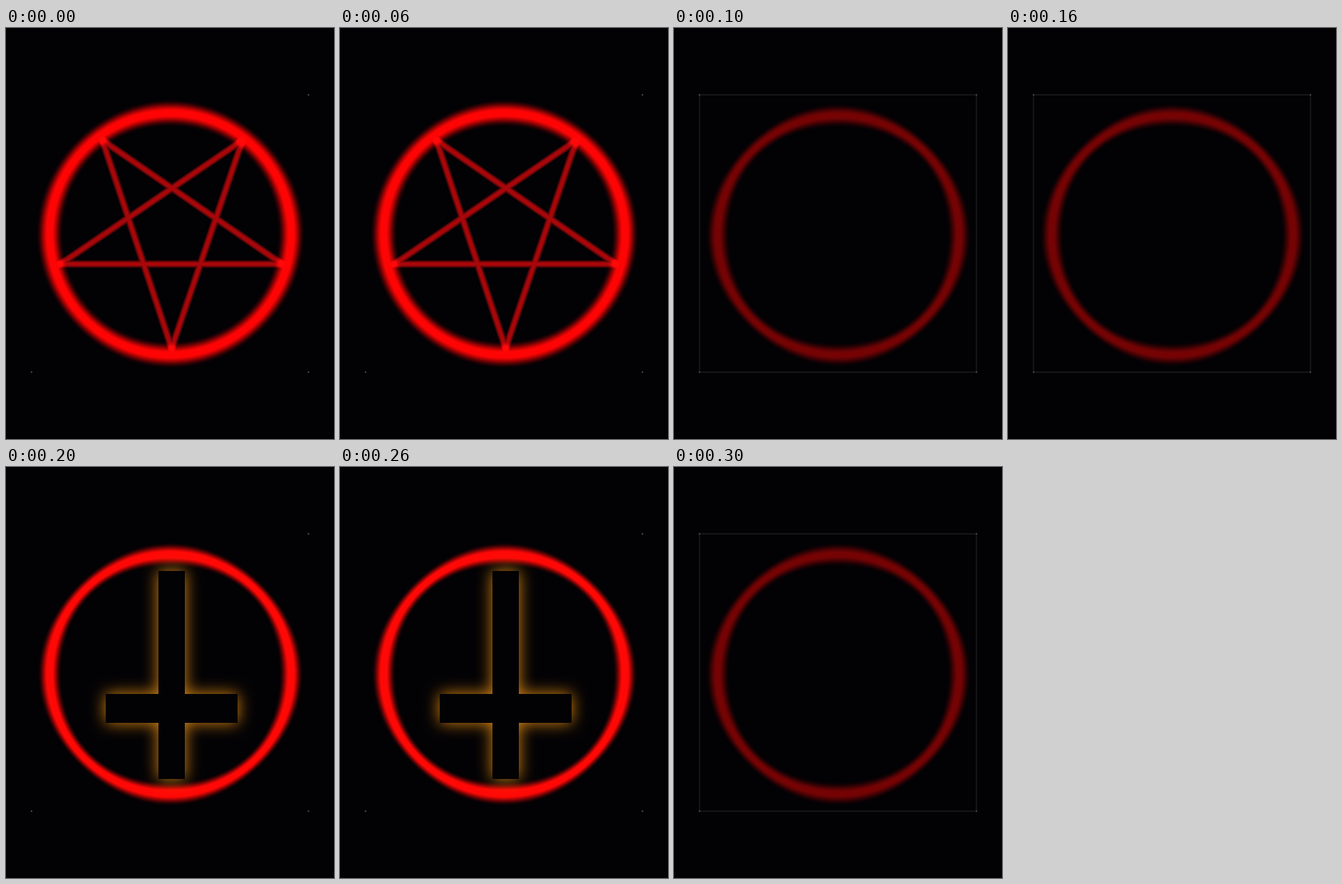
These frames come from a looping animation (398x498 px, 400 ms). An HTML page with a canvas:

```html
<!DOCTYPE html>
<html lang="en">
<head>
<meta charset="utf-8">
<title>Flashing ring</title>
<style>
  html, body { margin: 0; width: 100%; height: 100%; overflow: hidden; background: #020104; }
  canvas { display: block; }
</style>
</head>
<body>
<canvas id="stage" width="398" height="498"></canvas>
<script>
const W = 398, H = 498, STEP = 100;
const BACKGROUND = [2, 1, 4];
const FRAME = { left: 31, top: 81, right: 367, bottom: 417 };

// Soft ring; "pinch" makes it thinner on the diagonals.
function paintRing(ctx, { cy, ry, half, pinch, peak, core }) {
  const cx = 199.5, rx = 146.5;
  const image = ctx.createImageData(W, H);
  for (let y = 0, i = 0; y < H; y++) {
    for (let x = 0; x < W; x++, i += 4) {
      const dx = x + 0.5 - cx, dy = y + 0.5 - cy;
      const angle = Math.atan2(dy / ry, dx / rx);
      const radius = Math.hypot(rx * Math.cos(angle), ry * Math.sin(angle));
      const width = half * (1 - pinch * (1 - Math.cos(4 * angle)) / 2);
      const d = Math.min(1, Math.abs(Math.hypot(dx, dy) - radius) / width);
      const glow = Math.min(1, core * Math.cos(d * Math.PI / 2) ** 2);
      BACKGROUND.forEach((base, c) => {
        image.data[i + c] = base + (peak[c] - base) * glow;
      });
      image.data[i + 3] = 255;
    }
  }
  ctx.putImageData(image, 0, 0);
}

function paintStar(ctx) {
  const points = [[117, 136], [335, 286], [66, 286], [287, 136], [201, 388]];
  ctx.globalCompositeOperation = "lighter";
  ctx.lineJoin = "round";
  ctx.beginPath();
  points.forEach(([x, y]) => ctx.lineTo(x, y));
  ctx.closePath();
  for (const [width, color] of [[9, "#420202"], [6.5, "#380202"], [4, "#2c0202"]]) {
    ctx.lineWidth = width;
    ctx.strokeStyle = color;
    ctx.stroke();
  }
  ctx.globalCompositeOperation = "source-over";
}

function paintCross(ctx) {
  const cross = new Path2D("M185 126H217V275H281V310H217V378H185V310H121V275H185Z");
  ctx.fillStyle = "#000";
  ctx.globalCompositeOperation = "lighter";
  ctx.shadowColor = "#d8860e";
  ctx.shadowBlur = 19;
  ctx.fill(cross);
  ctx.shadowColor = "transparent";
  ctx.globalCompositeOperation = "source-over";
  ctx.fillStyle = `rgb(${BACKGROUND})`;
  ctx.fill(cross);
}

function paintDots(ctx, corners) {
  ctx.fillStyle = "#3a3a3a";
  for (const [x, y] of corners) ctx.fillRect(x - 1, y - 1, 2, 2);
}

function paintFrame(ctx) {
  const { left, top, right, bottom } = FRAME;
  ctx.strokeStyle = "#181a18";
  ctx.lineWidth = 1.5;
  ctx.strokeRect(left, top, right - left, bottom - top);
}

function makeScene(ring, ...painters) {
  const canvas = document.createElement("canvas");
  canvas.width = W;
  canvas.height = H;
  const ctx = canvas.getContext("2d");
  paintRing(ctx, ring);
  painters.forEach(paint => paint(ctx));
  return canvas;
}

const { left, top: upper, right, bottom } = FRAME;
const threeDots = [[right, upper], [left, bottom], [right, bottom]];
const drawThreeDots = ctx => paintDots(ctx, threeDots);
const drawFourDots = ctx => paintDots(ctx, [[left, upper], ...threeDots]);
const thinRing = { cy: 251, ry: 145, half: 15, pinch: 0.28 };

const star = makeScene(
  { cy: 249.5, ry: 146.5, half: 17, pinch: 0.1, peak: [255, 4, 4], core: 1.1 },
  paintStar, drawThreeDots);
const dim = makeScene(
  { ...thinRing, peak: [118, 3, 4], core: 1.05 },
  paintFrame, drawFourDots);
const cross = makeScene(
  { ...thinRing, peak: [255, 8, 6], core: 1.15 },
  paintCross, drawThreeDots);

const scenes = [star, dim, cross, dim];
const stage = document.getElementById("stage").getContext("2d");
const start = performance.now();

function draw() {
  const elapsed = performance.now() - start;
  stage.drawImage(scenes[Math.floor(elapsed / STEP) % scenes.length], 0, 0);
  requestAnimationFrame(draw);
}
draw();
</script>
</body>
</html>
```
